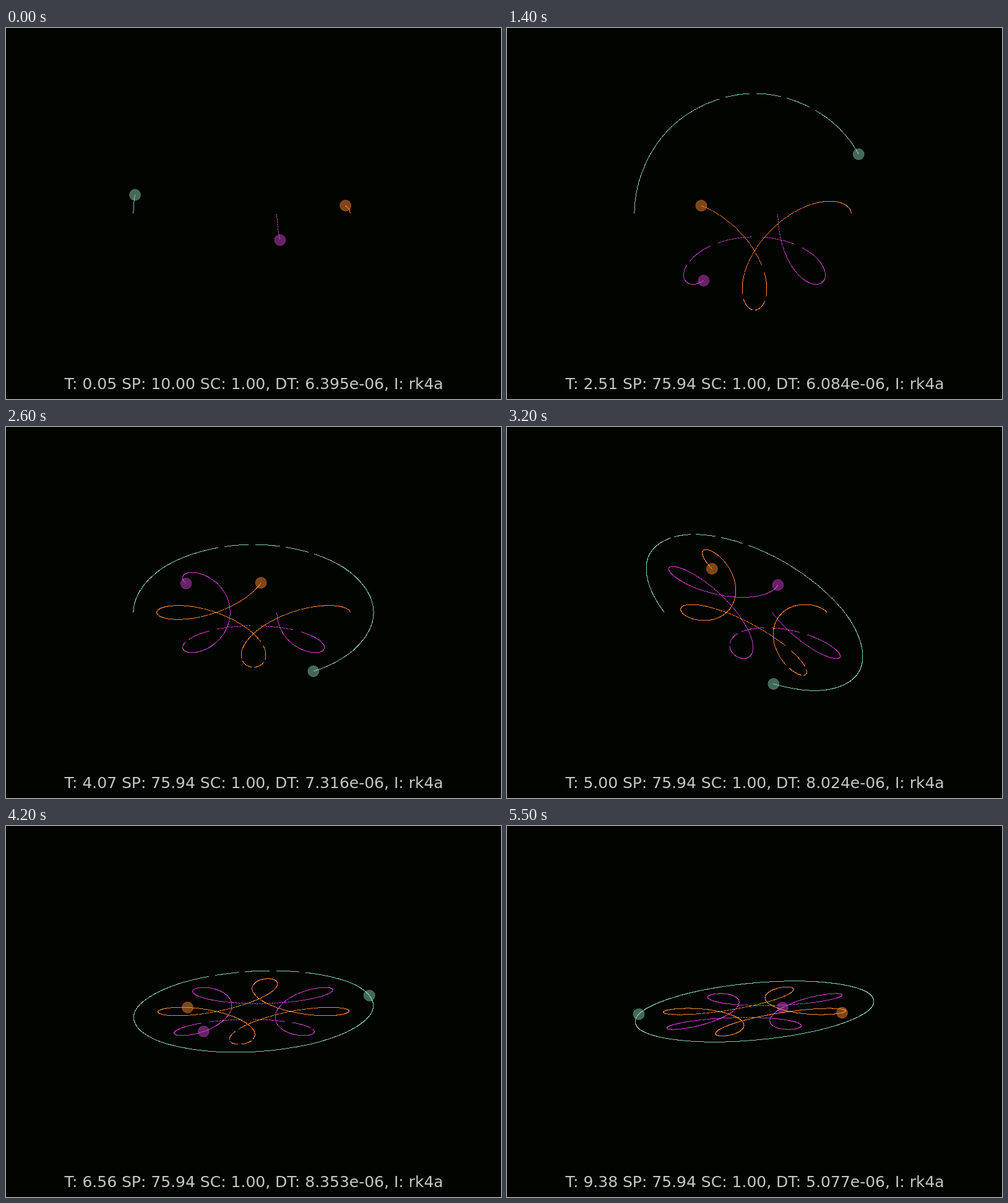
Animation of 800x600 px, one loop 5.6 s. Source, as an HTML page with a canvas:

```html
<!DOCTYPE html>
<html lang="en">
<head>
<meta charset="utf-8">
<title>Three-body orbit</title>
<style>
  html, body { margin: 0; width: 100%; height: 100%; overflow: hidden; background: #020400; }
  canvas { display: block; width: 800px; height: 600px; }
</style>
</head>
<body>
<canvas id="stage" width="800" height="600"></canvas>
<script>
const ctx = document.getElementById('stage').getContext('2d');
const LOOP = 5600, FRAME = 100;
const RAD = Math.PI / 180;
const SCALE = 160.8;          // pixels per length unit
const PERIOD = 8.684628;      // one turn of the outer body
const STEP = 0.0022, STRIDE = 3;
const COLORS = ['131,205,172', '205,64,205', '250,136,48'];
const SPEED_UPS = 5;          // presses of the faster key, one per frame

// Outer, middle and right body, equal masses on one line: x, vertical speed
const MIDDLE = [0.2355245585, 1.2795329643];
const RIGHT = [0.9712004534, -0.4021329019];
const OUTER = MIDDLE.map((v, i) => -v - RIGHT[i]);

const ramp = (f, from, to) => Math.max(0, Math.min(1, (f - from) / (to - from)));

// State layout: x, y, vx, vy for each body
function derive(s) {
  const d = new Array(12).fill(0);
  for (let i = 0; i < 12; i += 4) {
    d[i] = s[i + 2];
    d[i + 1] = s[i + 3];
    for (let j = 0; j < 12; j += 4) {
      if (i === j) continue;
      const dx = s[j] - s[i], dy = s[j + 1] - s[i + 1];
      const r3 = Math.hypot(dx, dy) ** 3;
      d[i + 2] += dx / r3;
      d[i + 3] += dy / r3;
    }
  }
  return d;
}

const advance = (s, d, h) => s.map((v, i) => v + d[i] * h);

function rk4(s, h) {
  const a = derive(s);
  const b = derive(advance(s, a, h / 2));
  const c = derive(advance(s, b, h / 2));
  const d = derive(advance(s, c, h));
  return s.map((v, i) => v + h / 6 * (a[i] + 2 * b[i] + 2 * c[i] + d[i]));
}

function integrate(end) {
  let s = [OUTER, MIDDLE, RIGHT].flatMap(([x, v]) => [x, 0, 0, v]);
  const path = [s];
  for (let t = 0; t <= end; t += STEP) path.push(s = rk4(s, STEP));
  return path;
}

// Simulated time: grows with the speed, then runs at changing paces
function clock(f) {
  if (f <= SPEED_UPS + 1) return 0.05 + 0.0635 * (1.5 ** f - 1);
  return 0.71 + 1.8 * ramp(f, 6, 14) + 1.49 * ramp(f, 14, 24) +
    0.07 * ramp(f, 24, 26) + 2.49 * ramp(f, 26, 42) + 2.82 * ramp(f, 42, 55);
}

const phaseAt = time => 57.5 * time + 6.1;
const path = integrate(phaseAt(clock(55)) / 360 * PERIOD);

function camera(f) {
  const tilt = 55.5 * ramp(f, 19, 26) - 6.1 * ramp(f, 26, 30) + 25.9 * ramp(f, 36, 43.5);
  const turn = 41.4 * ramp(f, 26, 30) + 158.9 * ramp(f, 36, 42.45);
  const ct = Math.cos(tilt * RAD), st = Math.sin(tilt * RAD);
  const cb = Math.cos(turn * RAD), sb = Math.sin(turn * RAD);
  return (s, body) => {
    const x = s[body * 4] * SCALE, y = s[body * 4 + 1] * SCALE;
    return [400 + x * cb + y * st * sb, 300 + y * ct];
  };
}

const skipped = phase => phase > 66 && phase < 128 && (phase - 58.2) % 14.8 < 3.1;

function drawDisc([x, y], color) {
  ctx.beginPath();
  ctx.arc(x, y, 9, 0, 2 * Math.PI);
  ctx.fillStyle = `rgba(${color},0.5)`;
  ctx.fill();
  ctx.strokeStyle = `rgba(${color},0.4)`;
  ctx.stroke();
}

function drawTrail(project, body, last) {
  ctx.fillStyle = `rgb(${COLORS[body]})`;
  for (let n = STRIDE; n <= last; n += STRIDE) {
    if (skipped(n * STEP / PERIOD * 360)) continue;
    const [x, y] = project(path[n], body);
    ctx.fillRect(Math.floor(x), Math.floor(y), 1, 1);
  }
}

function random(seed) {
  const r = Math.sin(seed * 12.9898 + 1) * 43758.5453;
  return r - Math.floor(r);
}

function drawStatus(f, time) {
  const speed = 10 * 1.5 ** Math.max(0, Math.min(SPEED_UPS, f - 1));
  const stepSize = 3.5 + 5.3 * random(f);
  ctx.font = '25px "DejaVu Sans", sans-serif';
  ctx.fillStyle = '#c4c6c2';
  ctx.fillText(`T: ${time.toFixed(2)} SP: ${speed.toFixed(2)} SC: 1.00, ` +
    `DT: ${stepSize.toFixed(3)}e-06, I: rk4a`, 94.5, 584);
}

function draw(ms) {
  const f = Math.floor((ms % LOOP) / FRAME);
  const time = clock(f);
  const project = camera(f);
  const now = Math.min(path.length - 1, Math.round(phaseAt(time) / 360 * PERIOD / STEP));
  ctx.fillStyle = '#020400';
  ctx.fillRect(0, 0, 800, 600);
  COLORS.forEach((color, body) => drawDisc(project(path[now], body), color));
  COLORS.forEach((color, body) => drawTrail(project, body, now));
  drawStatus(f, time);
}

const begin = performance.now();
function tick() {
  draw(performance.now() - begin);
  requestAnimationFrame(tick);
}
tick();
</script>
</body>
</html>
```
